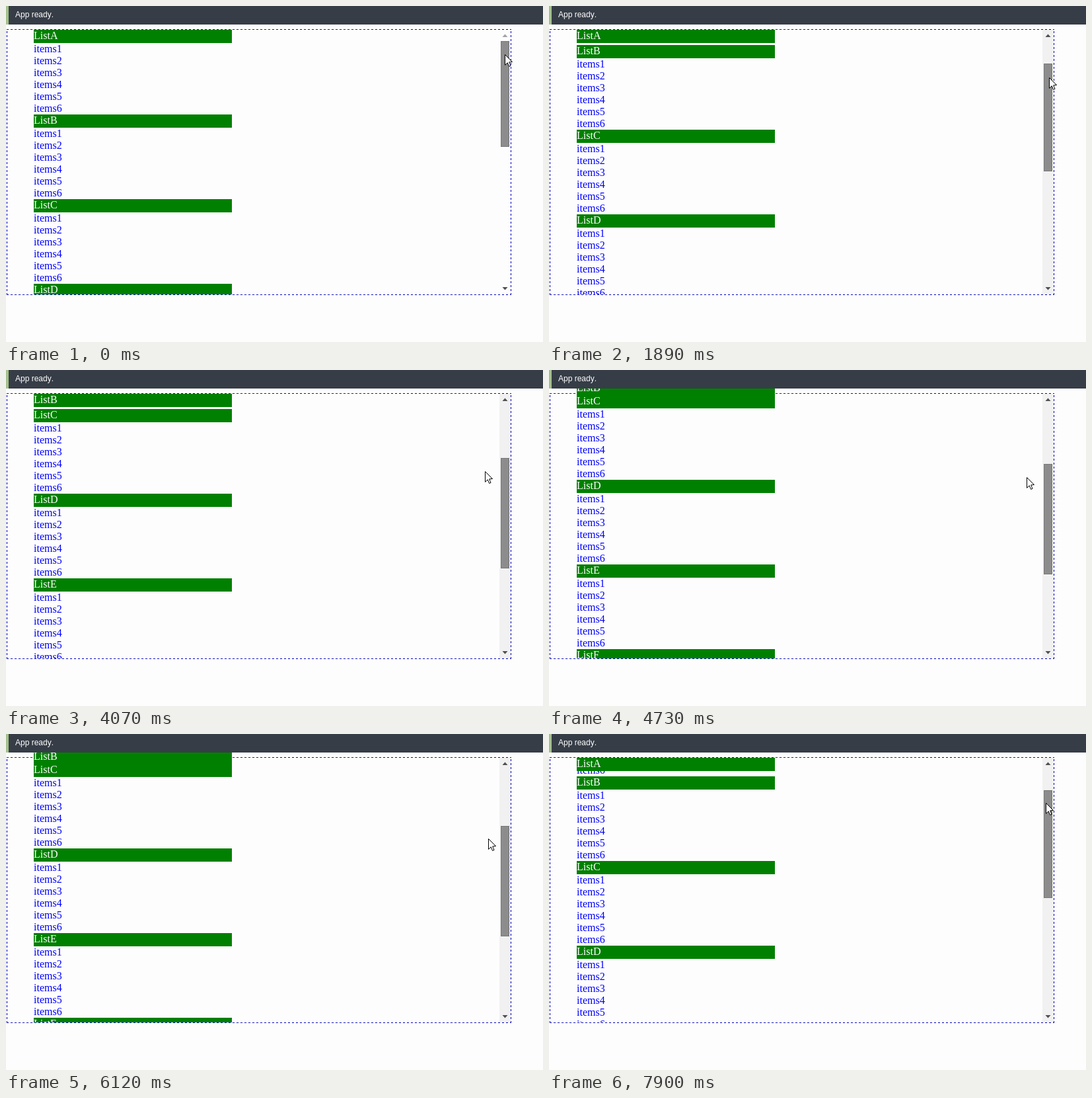
An HTML page with a canvas for the animation above (8000 ms loop, 813 by 508 pixels).

```html
<!DOCTYPE html>
<html>
<head>
<meta charset="utf-8">
<style>
html, body { margin: 0; width: 100%; height: 100%; overflow: hidden; background: #fdfdfd; }
canvas { display: block; }
</style>
</head>
<body>
<canvas id="stage" width="813" height="508"></canvas>
<script>
const ctx = document.getElementById('stage').getContext('2d', { alpha: false });
const LOOP = 8000, STEP = 136.2;
const TOP = 36, LEFT = 42, HEIGHT = 400, HEAD = 20, ROW = 18, ITEMS = 6, LIST = HEAD + ITEMS * ROW;
const SERIF = '16px "Liberation Serif", serif', SANS = '12px "Liberation Sans", Arial, sans-serif';

// The drag on the scrollbar, timed in screen updates
const drag = [
  { step: 0, scroll: 0, x: 755, y: 73 },
  { step: 2, scroll: 0, x: 754, y: 73 },
  { step: 14, scroll: 85, x: 757, y: 108 },
  { step: 23, scroll: 129, x: 741, y: 126 },
  { step: 30, scroll: 193, x: 725, y: 153 },
  { step: 39, scroll: 240, x: 720, y: 173 },
  { step: 41, scroll: 240, x: 720, y: 173 },
  { step: 50, scroll: 165, x: 743, y: 140 },
  { step: 58, scroll: 80, x: 752, y: 104 }
];

function poseAt(step) {
  const i = Math.max(1, drag.findIndex(key => key.step >= step));
  const a = drag[i - 1], b = drag[i];
  const part = (step - a.step) / (b.step - a.step);
  const mix = name => Math.round(a[name] + (b[name] - a[name]) * part);
  return { scroll: mix('scroll'), x: mix('x'), y: mix('y') };
}

function rect(color, x, y, w, h) {
  ctx.fillStyle = color;
  ctx.fillRect(x, y, w, h);
}

function text(str, x, y, color, font = SERIF) {
  ctx.font = font;
  ctx.fillStyle = color;
  ctx.fillText(str, x, y);
}

function polygon(color, ...points) {
  ctx.beginPath();
  points.forEach(([x, y]) => ctx.lineTo(x, y));
  ctx.closePath();
  ctx.fillStyle = color;
  ctx.fill();
}

function header(index, y) {
  rect('#008000', LEFT, y, 300, HEAD);
  text('List' + 'ABCDEFG'[index], LEFT, y + 14, '#fff');
}

function dashedLine(x1, y1, x2, y2, offset) {
  ctx.lineDashOffset = offset;
  ctx.beginPath();
  ctx.moveTo(x1, y1);
  ctx.lineTo(x2, y2);
  ctx.stroke();
}

function dashedBox() {
  ctx.strokeStyle = '#0000c0';
  ctx.setLineDash([3, 3]);
  for (const y of [35.5, 436.5]) dashedLine(1, y, 765, y, 0);
  for (const x of [1.5, 764.5]) dashedLine(x, 35, x, 437, 3);
  ctx.setLineDash([]);
}

function scrollbar(scroll, pinned) {
  if (scroll) rect('#f1f1f1', 747, TOP, 17, HEIGHT);
  polygon(scroll ? '#505050' : '#a3a3a3', [755.5, 42.5], [759.5, 47], [751.5, 47]);
  polygon('#505050', [751.5, 425], [759.5, 425], [755.5, 429.5]);
  const ratio = 365 / (912 - HEAD * pinned);
  const y = 53 + Math.floor(scroll * ratio), h = Math.floor(HEIGHT * ratio);
  rect('#787878', 749, y, 13, h);
  rect('#8c8c8c', 750, y + 1, 11, h - 2);
}

function pointer(x, y) {
  ctx.save();
  ctx.translate(x, y);
  polygon('#fff', [0.5, 0.5], [0.5, 16.3], [4.2, 12.8], [6.6, 18.4], [9, 17.4], [6.7, 11.9], [11.5, 11.5]);
  ctx.strokeStyle = '#000';
  ctx.lineJoin = 'round';
  ctx.stroke();
  ctx.restore();
}

function draw(time) {
  const { scroll, x, y } = poseAt(Math.floor((time + 20) / STEP));
  // Each pinned header leaves the flow, so the lists below move up by its height
  const pinned = scroll ? 1 + Math.floor(scroll / (LIST - HEAD)) : 0;
  const offset = TOP - scroll - HEAD * pinned;

  rect('#fdfdfd', 0, 0, 813, 508);
  dashedBox();
  ctx.save();
  ctx.beginPath();
  ctx.rect(2, TOP, 762, HEIGHT);
  ctx.clip();
  for (let list = 0; list < 7; list++) {
    const top = offset + list * LIST;
    if (list >= pinned) header(list, top);
    for (let i = 0; i < ITEMS; i++) text('items' + (i + 1), LEFT, top + HEAD + i * ROW + 14, '#00f');
  }
  scrollbar(scroll, pinned);
  ctx.restore();

  // The next list pushes the pinned header up under the bar
  if (pinned) header(pinned - 1, Math.min(TOP, offset + pinned * LIST - HEAD));
  rect('#363d47', 0, 0, 813, 28);
  rect('#a3c08c', 0, 0, 4, 28);
  text('App ready.', 14, 17, '#fff', SANS);
  pointer(x, y);
}

function tick() {
  draw(performance.now() % LOOP);
  requestAnimationFrame(tick);
}

ctx.fontKerning = 'none';
tick();
</script>
</body>
</html>
```
